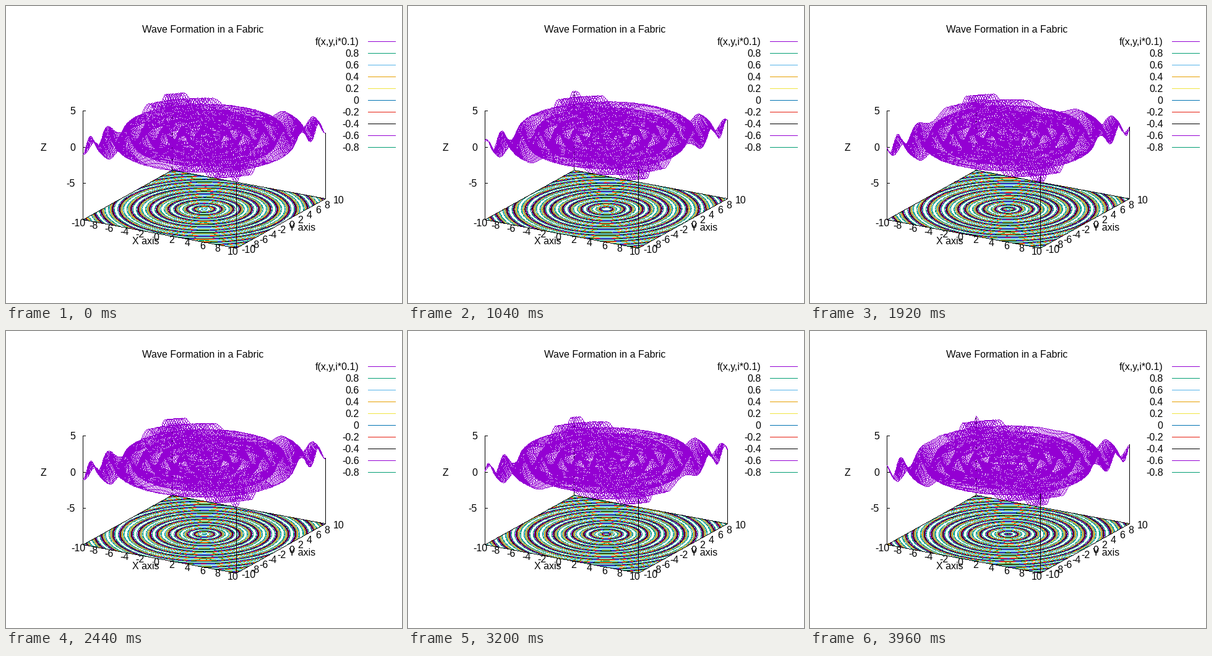
Recreate the animation shown at these times as a matplotlib script. Size 640 px wide and 480 px high, loop 4000 ms.

```python
import numpy as np
import matplotlib.pyplot as plt
from matplotlib.animation import FuncAnimation

W, H = 640, 480
FRAMES, INTERVAL = 100, 40
LIM, FLOOR = 10, -10
SAMPLES = 100

PURPLE, TEAL, SKY = "#9400d3", "#009e73", "#56b4e9"
ORANGE, YELLOW, BLUE, RED, BLACK = "#e69f00", "#f0e442", "#0072b2", "#e51e10", "#000000"
LEVELS = [0.8, 0.6, 0.4, 0.2, 0, -0.2, -0.4, -0.6, -0.8]
LEVEL_COLORS = [TEAL, SKY, ORANGE, YELLOW, BLUE, RED, BLACK, PURPLE, TEAL]


def wave(x, y, t):
    return np.sin(3 * np.hypot(x, y) - t)


def project(x, y, z):
    """Map data coordinates to stage pixels."""
    px = 320 + 12.4 * x + 7.2 * y
    py = 327.8 + 2.3 * x - 4 * y - 11.7 * (z - FLOOR)
    return np.stack(np.broadcast_arrays(px, py), axis=-1)


def rgb(color):
    return [int(color[i:i + 2], 16) for i in (1, 3, 5)]


def draw_segments(img, start, end, color):
    """Draw crisp one-pixel segments between rows of start and end."""
    p = np.floor(np.asarray(start, float).reshape(-1, 2) + 0.5)
    q = np.floor(np.asarray(end, float).reshape(-1, 2) + 0.5)
    if not len(p):
        return
    d = q - p
    n = np.abs(d).max(axis=1)
    step = d / np.maximum(n, 1)[:, None]
    color = rgb(color)
    for k in range(int(n.max()) + 1):
        live = n >= k
        pts = np.floor(p[live] + k * step[live] + 0.5).astype(int)
        img[pts[:, 1], pts[:, 0]] = color


def draw_path(img, pts, color):
    """Draw polylines; the second to last axis runs along each line."""
    draw_segments(img, pts[..., :-1, :], pts[..., 1:, :], color)


grid = np.linspace(-LIM, LIM, SAMPLES)
GX, GY = np.meshgrid(grid, grid)
FLOOR_PTS = project(GX, GY, FLOOR).reshape(-1, 2)

cell = np.arange(SAMPLES ** 2).reshape(SAMPLES, SAMPLES)
a, b = cell[:-1, :-1].ravel(), cell[:-1, 1:].ravel()
c, d = cell[1:, :-1].ravel(), cell[1:, 1:].ravel()
TRIS = np.concatenate([np.stack([a, b, d], 1), np.stack([a, d, c], 1)])


def contour_segments(values, level):
    """Cut every triangle that the level passes through."""
    above = values[TRIS] >= level
    count = above.sum(axis=1)
    cut = (count == 1) | (count == 2)
    tri, above, count = TRIS[cut], above[cut], count[cut]
    lone = np.where(count == 1, above.argmax(axis=1), above.argmin(axis=1))
    rows = np.arange(len(tri))
    apex = tri[rows, lone]
    ends = []
    for shift in (1, 2):
        other = tri[rows, (lone + shift) % 3]
        f = (level - values[apex]) / (values[other] - values[apex])
        ends.append(FLOOR_PTS[apex] + f[:, None] * (FLOOR_PTS[other] - FLOOR_PTS[apex]))
    return ends


def post(img, x, y, t):
    top = project(x, y, wave(x, y, t))
    draw_segments(img, project(x, y, FLOOR), top, BLACK)


def make_backdrop():
    img = np.full((H, W, 3), 255, np.uint8)
    draw_segments(img, project(-LIM, -LIM, FLOOR), project(-LIM, -LIM, 5), BLACK)
    for z in (-5, 0, 5):
        tick = project(-LIM, -LIM, z)
        draw_segments(img, tick, tick + [4, 0], BLACK)
    for i, color in enumerate([PURPLE] + LEVEL_COLORS):
        draw_segments(img, [585, 57 + 19 * i], [629, 57 + 19 * i], color)
    return img


BACKDROP = make_backdrop()
CORNERS = np.array([[-1, -1], [1, -1], [1, 1], [-1, 1], [-1, -1]]) * LIM
OUTLINE = project(CORNERS[:, 0], CORNERS[:, 1], FLOOR)


def render(i):
    t = i * 0.1
    img = BACKDROP.copy()
    post(img, -LIM, LIM, t)

    z = wave(GX, GY, t)
    draw_path(img, project(GX, GY, z), PURPLE)
    draw_path(img, project(GY, GX, z), PURPLE)

    values = z.ravel()
    for level, color in zip(LEVELS, LEVEL_COLORS):
        draw_segments(img, *contour_segments(values, level), color)

    draw_path(img, OUTLINE, BLACK)
    post(img, LIM, -LIM, t)
    post(img, LIM, LIM, t)
    return img


plt.rcParams["font.family"] = "Liberation Sans"
plt.rcParams["font.size"] = 11.52  # 16 px at 100 dpi
plt.rcParams["text.hinting"] = "default"

fig = plt.figure(figsize=(W / 100, H / 100), dpi=100, facecolor="white")
ax = fig.add_axes([0, 0, 1, 1])
ax.axis("off")
picture = ax.imshow(render(0), extent=(0, W, H, 0), interpolation="nearest", aspect="auto")
ax.set_xlim(0, W)
ax.set_ylim(H, 0)


def label(x, y, text, ha="left"):
    ax.text(x, y, text, ha=ha, va="baseline", color="black")


label(318.5, 43, "Wave Formation in a Fabric", "center")
label(204, 385, "X axis")
label(457, 363, "Y axis")
label(56, 234, "Z")

for v in range(-LIM, LIM + 1, 2):
    x, y = project(v, -LIM, FLOOR)
    label(x - (7 if v < 0 else 5), y + 11, str(v), "center")
    x, y = project(LIM, v, FLOOR)
    label(x + (8.5 if v < 0 else 12.9), y + 8, str(v))

for v in (-5, 0, 5):
    label(112, project(-LIM, -LIM, v)[1] + 6, str(v), "right")

for i, text in enumerate(["f(x,y,i*0.1)"] + [f"{v:g}" for v in LEVELS]):
    label(570.7, 63 + 19 * i, text, "right")


def update(i):
    picture.set_data(render(i))
    return [picture]


anim = FuncAnimation(fig, update, frames=FRAMES, interval=INTERVAL,
                     init_func=lambda: update(0), repeat=True, repeat_delay=0)
plt.show()
```
